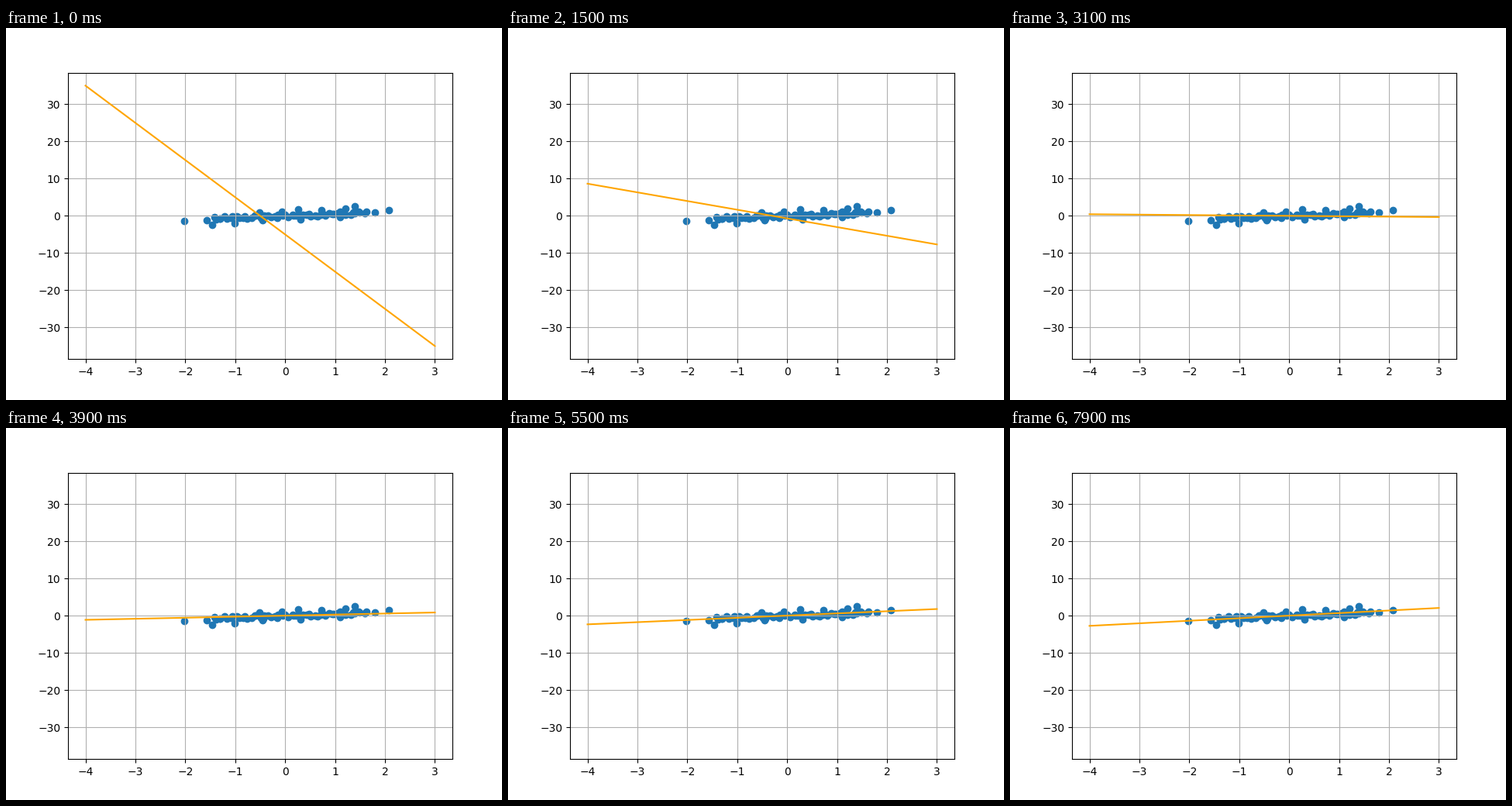
Animation, 640 px wide and 480 px high, one loop 8000 ms. Source, as a matplotlib script:

```python
import numpy as np
import matplotlib.pyplot as plt
from matplotlib.animation import FuncAnimation

FRAMES, INTERVAL = 80, 100

# Gradient descent for y = a*x + b on the mean squared error
RATE = 0.1
START = np.array([-10.0, -5.0])
BEST = np.array([0.705, 0.06])
HESSIAN = np.array([[0.78, 0.07], [0.07, 1.0]])

# Samples that stand out from the band
OUTLIERS = [
    (-2.02, -1.4), (-1.57, -1.2), (-1.46, -2.4), (-1.01, -2.0),
    (-0.52, 0.9), (-0.45, -1.2), (-0.07, 1.1), (0.26, 1.7),
    (0.31, -1.0), (0.73, 1.5), (1.1, -0.4), (1.21, 1.9),
    (1.39, 2.5), (1.8, 0.9), (2.08, 1.5),
]


def samples(count=54):
    rng = np.random.default_rng(4)
    x = np.linspace(-1.45, 1.63, count) + rng.uniform(-0.03, 0.03, count)
    y = 0.55 * x + 0.05 + rng.uniform(-0.55, 0.55, count)
    return np.vstack([np.column_stack([x, y]), OUTLIERS])


def weights(step):
    shrink = np.linalg.matrix_power(np.eye(2) - RATE * HESSIAN, step)
    return BEST + shrink @ (START - BEST)


fig, ax = plt.subplots(figsize=(6.4, 4.8), dpi=100)
ax.scatter(*samples().T, color="tab:blue")
ax.grid(True)

# The first, steepest line sets the limits of the axes
xs = np.array([-4.0, 3.0])
line, = ax.plot(xs, np.polyval(START, xs), color="orange")


def update(step):
    line.set_ydata(np.polyval(weights(step), xs))
    return line,


anim = FuncAnimation(fig, update, frames=FRAMES, interval=INTERVAL,
                     repeat=True, repeat_delay=0)
plt.show()
```
